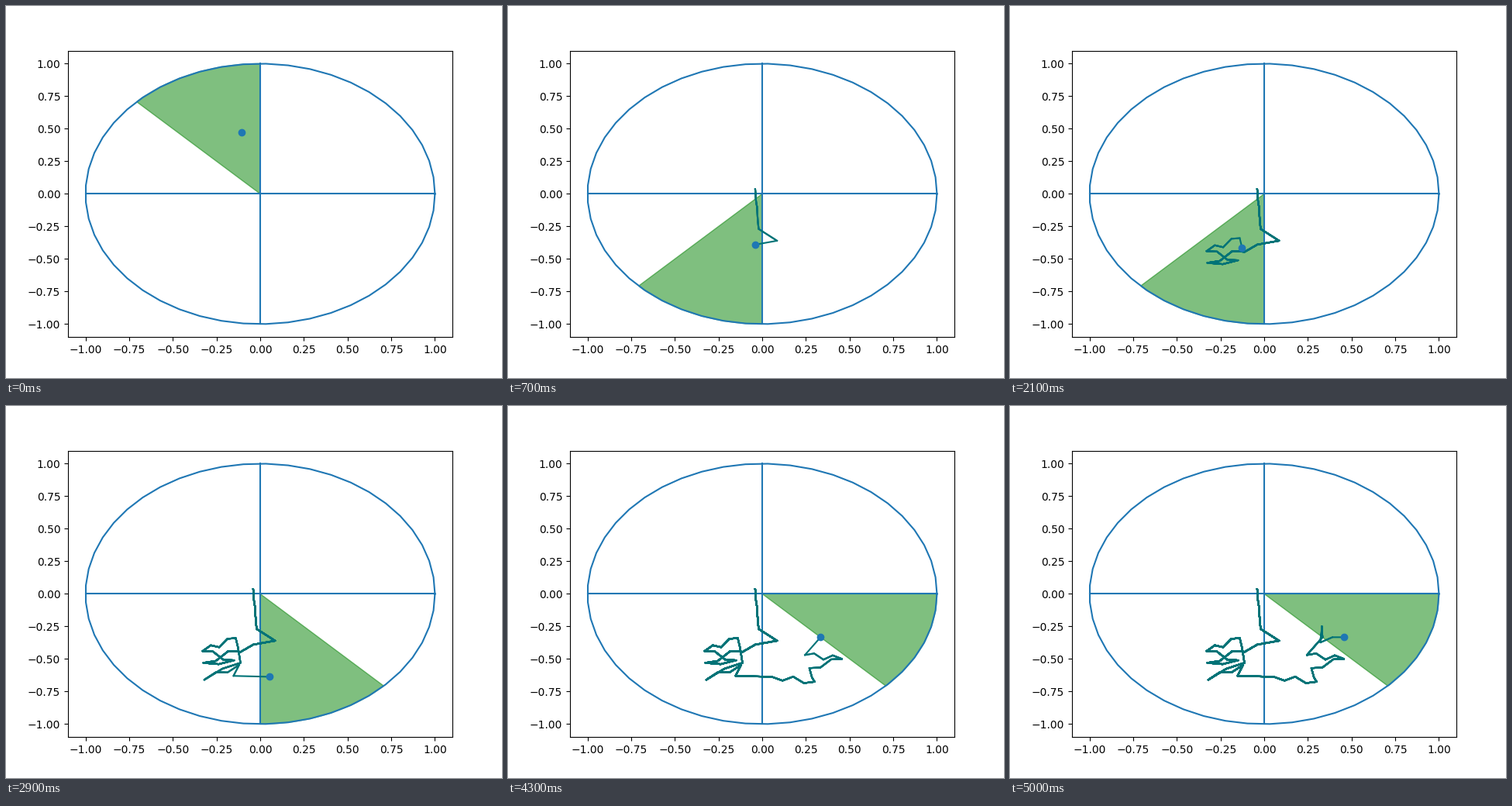
Recreate the animation shown at these times as a matplotlib script. Size 640x480 px, loop 5.6 s.

```python
import numpy as np
import matplotlib.pyplot as plt
from matplotlib.animation import FuncAnimation
from matplotlib.patches import Wedge

WIDTH, HEIGHT, DPI = 640, 480, 100
FRAMES, INTERVAL = 56, 100
STEPS = 51
SWAY = 0.02
BLUE, TEAL = "C0", "#007377"

# Main turns of the walk: step, x, y
TURNS = np.array([
    (0, -.105, .475), (1, -.04, .035), (5, -.02, -.27), (6, .085, -.36),
    (7, -.04, -.39), (11, -.325, -.53), (13, -.15, -.51), (16, -.33, -.44),
    (20, -.14, -.34), (22, -.113, -.53), (24, -.32, -.66), (27, -.12, -.545),
    (28, -.153, -.63), (29, .055, -.637), (33, .3, -.675), (35, .27, -.57),
    (38, .457, -.5), (42, .244, -.47), (43, .334, -.333), (45, .33, -.25),
    (48, .322, -.373), (50, .459, -.333),
])


def make_walk():
    """Straight runs between turns, with a small up-and-down sway."""
    steps = np.arange(STEPS)
    x, y = (np.interp(steps, TURNS[:, 0], TURNS[:, col]) for col in (1, 2))
    between = ~np.isin(steps, TURNS[:, 0])
    y -= SWAY * between * (-1.0) ** steps
    return np.column_stack([x, y])


fig, ax = plt.subplots(figsize=(WIDTH / DPI, HEIGHT / DPI), dpi=DPI)
ax.set_xlim(-1.1, 1.1)
ax.set_ylim(-1.1, 1.1)

ring = np.linspace(0, 2 * np.pi, 50)
ax.plot(np.cos(ring), np.sin(ring), color=BLUE)
ax.plot([-1, 1], [0, 0], color=BLUE)
ax.plot([0, 0], [-1, 1], color=BLUE)

path = make_walk()

# The whole trail is laid down again at every step, so older parts grow denser
trails = [ax.plot(*path[1:end].T, color=TEAL, visible=False)[0]
          for end in range(3, STEPS + 1)]
dot, = ax.plot([], [], "o", color=BLUE, zorder=3)
sector = ax.add_patch(Wedge((0, 0), 1, 90, 135, color="green", alpha=0.5))


def draw(frame):
    step = min(frame, STEPS - 1)
    x, y = path[step]
    dot.set_data([x], [y])
    start = np.degrees(np.arctan2(y, x)) % 360 // 45 * 45
    sector.set_theta1(start)
    sector.set_theta2(start + 45)
    for i, trail in enumerate(trails):
        trail.set_visible(i + 2 <= step)
    return [sector, *trails, dot]


anim = FuncAnimation(fig, draw, frames=FRAMES, interval=INTERVAL,
                     repeat=True, repeat_delay=0)
plt.show()
```
